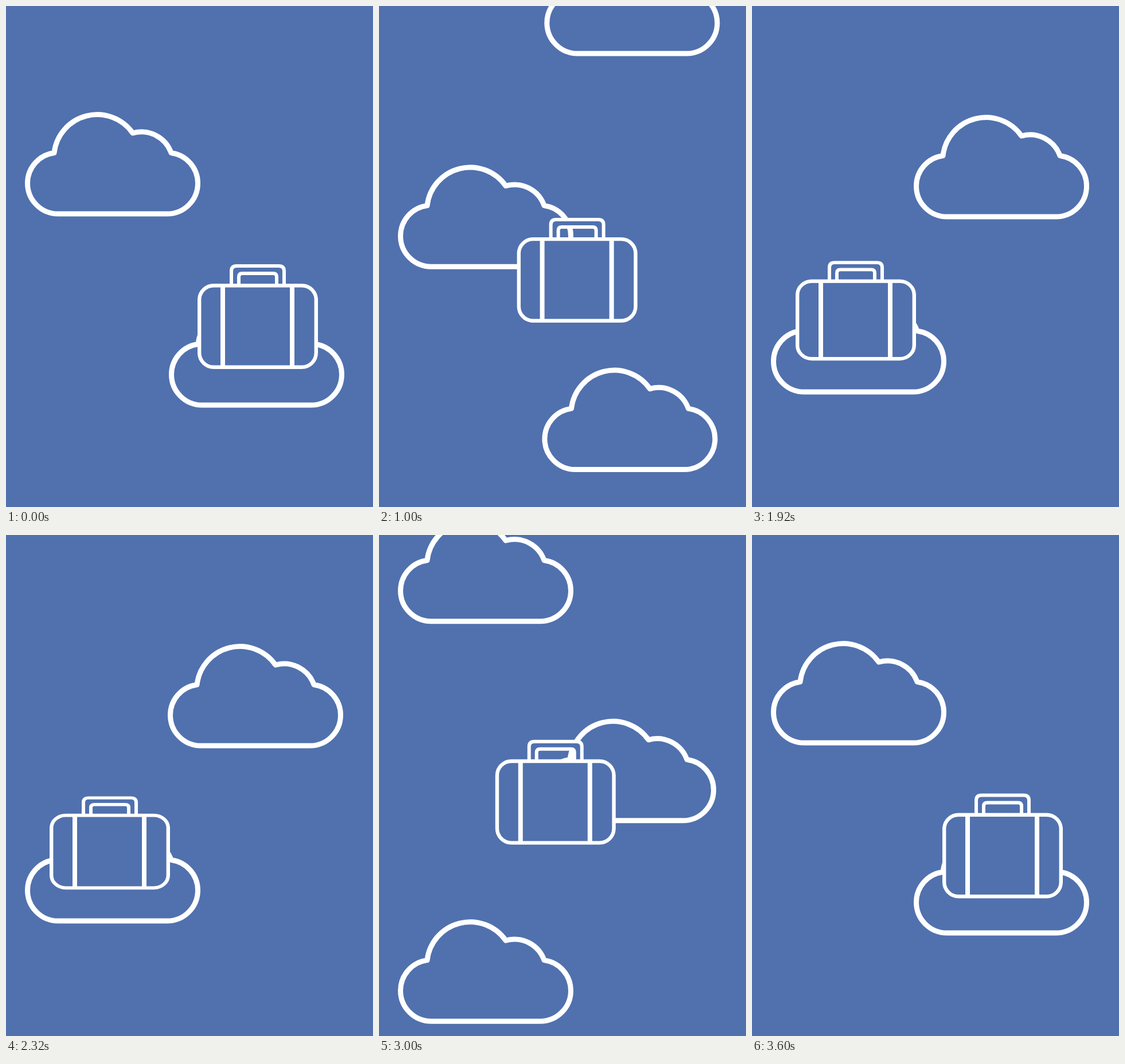
An HTML page that plays this animation: 640 by 875 pixels, repeating every 3.64 s.

```html
<!DOCTYPE html>
<html lang="en">
<head>
<meta charset="utf-8">
<title>Travelling suitcase</title>
<style>
  html, body { margin: 0; width: 100%; height: 100%; overflow: hidden; background: #5071ae; }
  svg { display: block; width: 640px; height: 875px; }
  .line { fill: #5071ae; stroke: #fff; stroke-linejoin: round; }
</style>
</head>
<body>
<svg viewBox="0 0 640 875">
  <defs>
    <path id="cloud" class="line" stroke-width="9"
      d="M91 363A53.5 53.5 0 0 1 37.5 309.5A53.5 53.5 0 0 1 84 256.5A75.5 75.5 0 0 1 221 222A55 55 0 0 1 288 256.5A53.5 53.5 0 0 1 334.5 309.5A53.5 53.5 0 0 1 281 363Z"/>
  </defs>
  <g id="sky"></g>
  <g id="case" class="line" stroke-width="6.4">
    <path fill-rule="evenodd" stroke="none"
      d="M59-146V-171Q59-180 68-180H142Q151-180 151-171V-146H138V-161Q138-167 132-167H78Q72-167 72-161V-146Z"/>
    <path fill="none" stroke-width="6"
      d="M59-146V-171Q59-180 68-180H142Q151-180 151-171V-146M72-146V-161Q72-167 78-167H132Q138-167 138-161V-146"/>
    <rect x="3.2" y="-145.8" width="203.6" height="142.6" rx="25"/>
    <path stroke-width="8" d="M44-146V-3M165-146V-3"/>
  </g>
</svg>
<script>
const LOOP = 3640, STEP = 40;
const SWING = 440, SETTLE = 220;  // ms of squash or stretch around take-off, and after landing

const ramp = (t, from, to) => Math.min(1, Math.max(0, (t - from) / (to - from)));
const mix = (a, b, p) => a + (b - a) * p;

// Start place, then the way travelled in the first and second scroll
const clouds = [
  { x: 0, y: 0, dx: 0, fall: [311, 414], delay: 0 },
  { x: 251, y: 334, dx: 1.5, fall: [380, 0], delay: 0 },
  { x: 258, y: -400, dx: -9, fall: [405, 327], delay: 40 },
  { x: 0, y: -368, dx: 0, fall: [0, 368], delay: 0 }
];

const right = { x: 334, y: 634 }, left = { x: 76, y: 619.2 };
const hops = [
  { from: right, to: left, start: 535, end: 1820, height: 82, dip: .05 },
  { from: left, to: { x: 332, y: 634.5 }, start: 2480, end: 3530, height: 86, dip: 0 }
];

const sky = document.getElementById("sky");
const suitcase = document.getElementById("case");
for (const c of clouds) {
  c.el = document.createElementNS("http://www.w3.org/2000/svg", "use");
  c.el.setAttribute("href", "#cloud");
  sky.append(c.el);
}

function drawCloud(c, t) {
  const p = ramp(t, 680, 1760), q = ramp(t, 2560 + c.delay, 3600);
  const y = c.y + c.fall[0] * p + c.fall[1] * q;
  c.el.setAttribute("transform", `translate(${c.x + c.dx * p} ${y})`);
}

function drawCase(t) {
  const hop = hops[t < hops[1].start - SWING ? 0 : 1];
  const p = ramp(t, hop.start, hop.end);

  // Crouch before take-off, stretch after it, dip on landing
  const swing = mix(-1, 1, ramp(t, hop.start - SWING, hop.start + SWING));
  const settle = ramp(t, hop.end, hop.end + SETTLE);
  const stretch = .122 * Math.sin(Math.PI * swing) - hop.dip * Math.sin(Math.PI * settle);

  const x = mix(hop.from.x, hop.to.x, p);
  const ground = mix(hop.from.y, hop.to.y, p);
  const lift = 4 * hop.height * p * (1 - p) - 60 * Math.max(0, stretch);
  suitcase.setAttribute("transform", `translate(${x} ${ground - lift}) scale(1 ${1 + stretch})`);
}

const start = performance.now();
function tick() {
  const t = Math.floor((performance.now() - start) % LOOP / STEP) * STEP;
  clouds.forEach(c => drawCloud(c, t));
  drawCase(t);
  requestAnimationFrame(tick);
}
tick();
</script>
</body>
</html>
```
